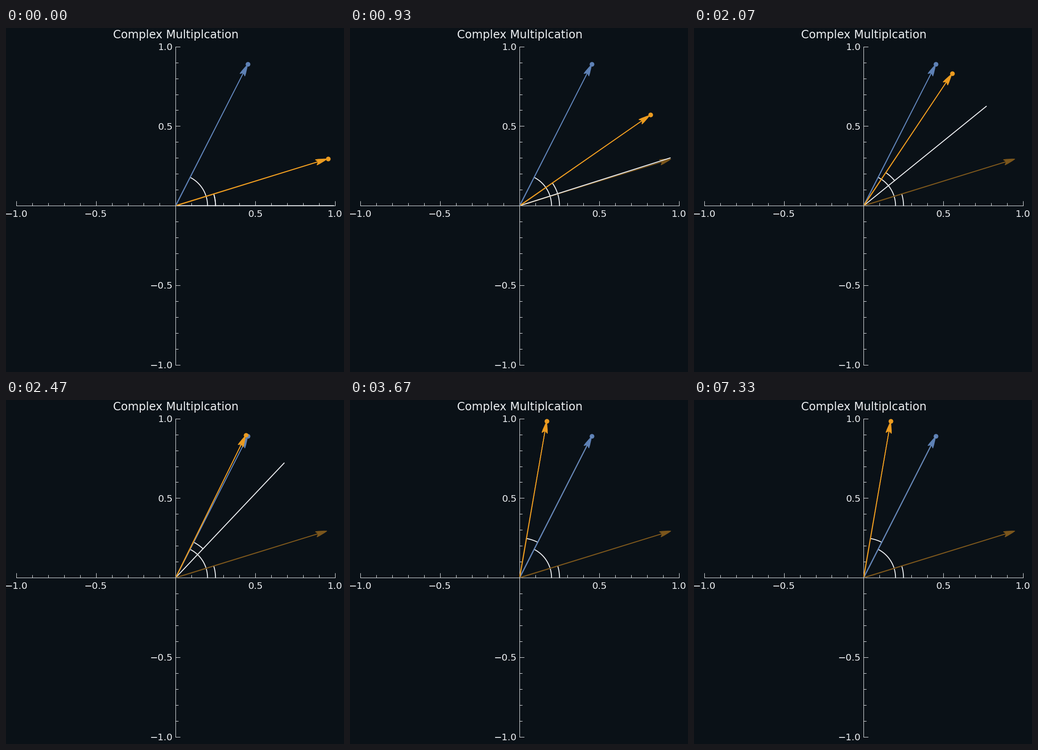
These frames come from a looping animation (720 by 734 pixels, 8000 ms). A matplotlib script:

```python
import numpy as np
import matplotlib.pyplot as plt
from matplotlib.animation import FuncAnimation
from matplotlib.patches import FancyArrowPatch
from matplotlib.ticker import MultipleLocator

W, H, DPI = 720, 734, 64
PX = 72 / DPI  # points per pixel

BACK, INK = "#0a1117", "#eceff2"
BLUE, ORANGE, BROWN = "#5e81b5", "#eb9b20", "#7b561c"

LOOP, TICK = 8000, 20      # ms
STEP, STEPS = 1000 / 15, 50  # the pose changes 15 times a second
LEAD = 14                  # ms, keeps a step from falling one tick late
ALPHA, BETA = 0.3, 1.1     # arguments of the two unit numbers

plt.rcParams["font.family"] = "DejaVu Sans"


def unit(angle, radius=1.0):
    return radius * np.cos(angle), radius * np.sin(angle)


def arc_points(start, stop, radius):
    return unit(np.linspace(start, stop, 60), radius)


def add_arc(start, stop, radius):
    return ax.plot(*arc_points(start, stop, radius), color=INK, lw=2 * PX)[0]


def add_dot(angle, color):
    x, y = unit(angle)
    return ax.plot([x], [y], "o", color=color, ms=8.6 * PX, mew=1.4 * PX)[0]


def add_ray(angle, style, color, width):
    ray = FancyArrowPatch((0, 0), unit(angle), arrowstyle=style, color=color,
                          lw=width * PX, mutation_scale=PX,
                          shrinkA=2.8 * PX, shrinkB=2.8 * PX, zorder=3)
    return ax.add_patch(ray)


def add_arrow(angle, color):
    style = "fancy,head_length=23,head_width=11.4,tail_width=0.9"
    return add_ray(angle, style, color, 1.6)


fig = plt.figure(figsize=(W / DPI, H / DPI), dpi=DPI, facecolor=BACK)
ax = fig.add_axes([21.9 / W, 15.3 / H, 679 / W, 679 / H], facecolor="none")
ax.set(xlim=(-1, 1), ylim=(-1, 1))
fig.text(361.5 / W, 1 - 22 / H, "Complex Multiplcation", color=INK,
         size=24 * PX, ha="center", va="baseline")

# Axes crossing at the origin, ticks pointing inwards
for side in ("left", "bottom"):
    ax.spines[side].set(position="zero", color=INK, linewidth=PX)
for side in ("right", "top"):
    ax.spines[side].set_visible(False)
for axis in (ax.xaxis, ax.yaxis):
    axis.set_ticks([-1, -0.5, 0.5, 1])
    axis.set_minor_locator(MultipleLocator(0.1))
ax.tick_params(which="both", direction="in", color=INK, labelcolor=INK,
               width=PX, labelsize=20 * PX)
ax.tick_params(which="major", length=10 * PX)
ax.tick_params(which="minor", length=6 * PX)
ax.tick_params(axis="x", which="major", pad=8.6 * PX)
ax.tick_params(axis="y", which="major", pad=6.2 * PX)

add_arc(0, BETA, 0.2)
add_arc(0, ALPHA, 0.25)
moving_arc = add_arc(0, ALPHA, 0.25)
add_dot(BETA, BLUE)
moving_dot = add_dot(ALPHA, ORANGE)

add_arrow(ALPHA, BROWN)
base_ray = add_ray(0, "-", INK, 2)
add_arrow(BETA, BLUE)
moving_arrow = add_arrow(ALPHA, ORANGE)


def update(i):
    step = min(int((i * TICK + LEAD) / STEP), STEPS)
    turn = BETA * step / STEPS
    tip = unit(turn + ALPHA)
    base_ray.set_positions((0, 0), unit(turn))
    moving_arrow.set_positions((0, 0), tip)
    moving_dot.set_data([tip[0]], [tip[1]])
    moving_arc.set_data(*arc_points(turn, turn + ALPHA, 0.25))
    return base_ray, moving_arrow, moving_dot, moving_arc


anim = FuncAnimation(fig, update, frames=LOOP // TICK, interval=TICK,
                     repeat=True, repeat_delay=0, blit=False)
plt.show()
```
